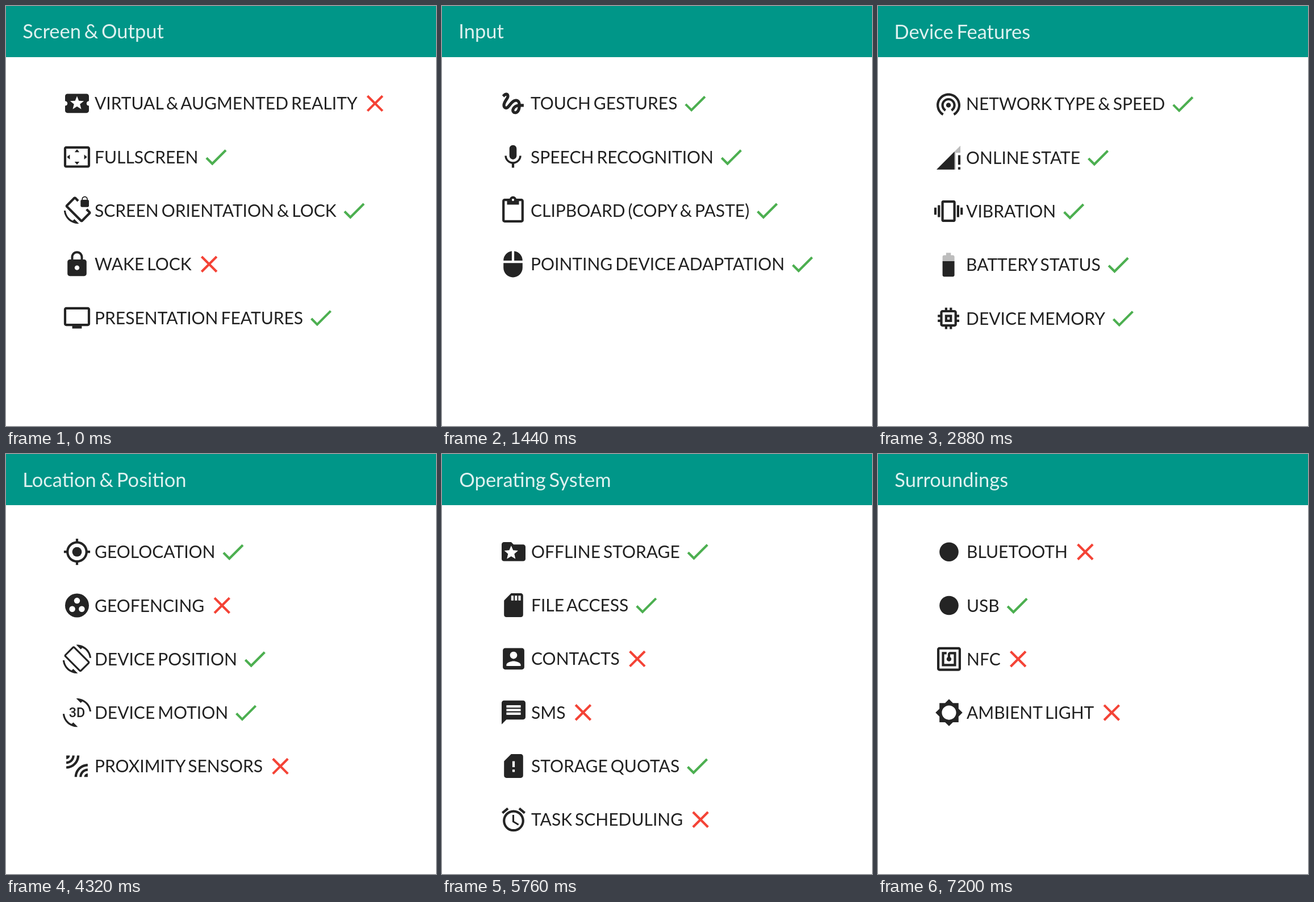
Recreate the animation shown at these times as an HTML page. Size 757 by 739 pixels, loop 8000 ms.

```html
<!DOCTYPE html>
<html lang="en">
<head>
<meta charset="utf-8">
<title>Device capabilities</title>
<style>
  html, body { margin: 0; width: 100%; height: 100%; overflow: hidden; background: #fff; }
  svg { display: block; width: 757px; height: 739px; }
  text { font-family: Lato, sans-serif; word-spacing: -.09em; }
  .title { font-size: 34.5px; fill: #fff; fill-opacity: .87; }
  .label { font-size: 30px; fill: #212121; }
  .icon { fill: #242424; fill-rule: evenodd; }
  .yes { fill: #4caf50; }
  .no { fill: #f44336; }
  .faint { fill-opacity: .3; }
  .glyph { font: 500 11.1px Roboto, sans-serif; text-anchor: middle; }
</style>
</head>
<body>
<svg id="stage" viewBox="0 0 757 739" xmlns="http://www.w3.org/2000/svg">
  <rect width="757" height="739" fill="#fff"/>
  <rect width="757" height="90" fill="#009688"/>
</svg>
<script>
const NS = 'http://www.w3.org/2000/svg';
const stage = document.getElementById('stage');
const ICON = 50.4, LEFT = 99.8, TOP = 171.4, PITCH = 94.3, GAP = 5.8;
const HOLD = 1440, LOOP = 8000;

const p = (d, cls = '') => `<path class="${cls}" d="${d}"/>`;
const dot = r => `<circle cx="12" cy="12" r="${r}"/>`;

// Shared pieces on a 24-unit grid
const turnTop = 'M16.48 2.52c3.27 1.55 5.61 4.72 5.97 8.48h1.5C23.44 4.84 18.29 0 12 0l-.66.03 3.81 3.81z';
const turnBottom = 'M7.52 21.48C4.25 19.94 1.91 16.76 1.55 13H.05C.56 19.16 5.71 24 12 24l.66-.03-3.81-3.81z';
const card = 'M18 2h-8L4.02 8 4 20c0 1.1.9 2 2 2h12c1.1 0 2-.9 2-2V4c0-1.1-.9-2-2-2z';

const icons = {
  yes: p('M9 16.2L4.8 12l-1.4 1.4L9 19 21 7l-1.4-1.4z'),
  no: p('M19 6.41L17.59 5 12 10.59 6.41 5 5 6.41 10.59 12 5 17.59 6.41 19 12 13.41 17.59 19 19 17.59 13.41 12z'),
  ticket: p('M20 12c0-1.1.9-2 2-2V6c0-1.1-.9-2-2-2H4c-1.1 0-1.99.9-1.99 2v4c1.1 0 1.99.9 1.99 2s-.89 2-2 2v4c0 1.1.9 2 2 2h16c1.1 0 2-.9 2-2v-4c-1.1 0-2-.9-2-2zm-4.42 4.8L12 14.5l-3.58 2.3 1.08-4.12-3.29-2.69 4.24-.25L12 5.8l1.54 3.95 4.24.25-3.29 2.69z'),
  overscan: p('M12.01 5.5L10 8h4zM18 10v4l2.5-1.99zM6 10l-2.5 2.01L6 14zM14 16h-4l2.01 2.5zM21 3H3c-1.1 0-2 .9-2 2v14c0 1.1.9 2 2 2h18c1.1 0 2-.9 2-2V5c0-1.1-.9-2-2-2zm0 16.01H3V4.99h18z'),
  rotateLock: p('M23.25 12.77l-2.57-2.57-1.41 1.41 2.22 2.22-5.66 5.66L4.51 8.17l5.66-5.66 2.1 2.1 1.41-1.41L11.23.75c-.59-.59-1.54-.59-2.12 0L2.75 7.11c-.59.59-.59 1.54 0 2.12l12.02 12.02c.59.59 1.54.59 2.12 0l6.36-6.36c.59-.59.59-1.54 0-2.12zM8.47 20.48C5.2 18.94 2.86 15.76 2.5 12H1c.51 6.16 5.66 11 11.95 11l.66-.03-3.81-3.82zM16 9h5c.55 0 1-.45 1-1V4c0-.55-.45-1-1-1v-.5C21 1.12 19.88 0 18.5 0S16 1.12 16 2.5V3c-.55 0-1 .45-1 1v4c0 .55.45 1 1 1zm.8-6.5c0-.94.76-1.7 1.7-1.7s1.7.76 1.7 1.7V3h-3.4z'),
  lock: p('M18 8h-1V6c0-2.76-2.24-5-5-5S7 3.24 7 6v2H6c-1.1 0-2 .9-2 2v10c0 1.1.9 2 2 2h12c1.1 0 2-.9 2-2V10c0-1.1-.9-2-2-2zm-6 9c-1.1 0-2-.9-2-2s.9-2 2-2 2 .9 2 2-.9 2-2 2zm3.1-9H8.9V6c0-1.71 1.39-3.1 3.1-3.1s3.1 1.39 3.1 3.1z'),
  screen: p('M21 3H3c-1.1 0-2 .9-2 2v12c0 1.1.9 2 2 2h5v2h8v-2h5c1.1 0 2-.9 2-2V5c0-1.1-.9-2-2-2zm0 14H3V5h18z'),
  gesture: p('M4.59 6.89c.7-.71 1.4-1.35 1.71-1.22.5.2 0 1.03-.3 1.52-.25.42-2.86 3.89-2.86 6.31 0 1.28.48 2.34 1.34 2.98.75.56 1.74.73 2.64.46 1.07-.31 1.95-1.4 3.06-2.77 1.21-1.49 2.83-3.44 4.08-3.44 1.63 0 1.65 1.01 1.76 1.79-3.78.64-5.38 3.67-5.38 5.37s1.44 3.09 3.21 3.09c1.63 0 4.29-1.33 4.69-6.1H21v-2.5h-2.47c-.15-1.65-1.09-4.2-4.03-4.2-2.25 0-4.18 1.91-4.94 2.84-.58.73-2.06 2.48-2.29 2.72-.25.3-.68.84-1.11.84-.45 0-.72-.83-.36-1.92.35-1.09 1.4-2.86 1.85-3.52.78-1.14 1.3-1.92 1.3-3.28C8.95 3.69 7.31 3 6.44 3 5.12 3 3.97 4 3.72 4.25c-.36.36-.66.66-.88.93zm9.29 11.66c-.31 0-.74-.26-.74-.72 0-.6.73-2.2 2.87-2.76-.3 2.69-1.43 3.48-2.13 3.48z'),
  mic: p('M12 14c1.66 0 3-1.34 3-3V5c0-1.66-1.34-3-3-3S9 3.34 9 5v6c0 1.66 1.34 3 3 3zm5.3-3c0 3-2.54 5.1-5.3 5.1S6.7 14 6.7 11H5c0 3.41 2.72 6.23 6 6.72V21h2v-3.28c3.28-.48 6-3.3 6-6.72z'),
  clipboard: p('M19 2h-4.18C14.4.84 13.3 0 12 0S9.6.84 9.18 2H5c-1.1 0-2 .9-2 2v16c0 1.1.9 2 2 2h14c1.1 0 2-.9 2-2V4c0-1.1-.9-2-2-2zm-7 0c.55 0 1 .45 1 1s-.45 1-1 1-1-.45-1-1 .45-1 1-1zm7 18H5V4h2v3h10V4h2z'),
  mouse: p('M13 1.07V9h7c0-4.08-3.05-7.44-7-7.93zM4 15c0 4.42 3.58 8 8 8s8-3.58 8-8v-4H4zM11 1.07C7.05 1.56 4 4.92 4 9h7z'),
  tether: p('M12 11c-1.1 0-2 .9-2 2s.9 2 2 2 2-.9 2-2-.9-2-2-2zm6 2c0-3.31-2.69-6-6-6s-6 2.69-6 6c0 2.22 1.21 4.15 3 5.19l1-1.74c-1.19-.7-2-1.97-2-3.45 0-2.21 1.79-4 4-4s4 1.79 4 4c0 1.48-.81 2.75-2 3.45l1 1.74c1.79-1.04 3-2.97 3-5.19zM12 3C6.48 3 2 7.48 2 13c0 3.7 2.01 6.92 4.99 8.65l1-1.73C5.61 18.53 4 15.96 4 13c0-4.42 3.58-8 8-8s8 3.58 8 8c0 2.96-1.61 5.53-4 6.92l1 1.73c2.99-1.73 5-4.95 5-8.65 0-5.52-4.48-10-10-10z'),
  signal: p('M22 8V2L2 22h16V8z', 'faint') + p('M17 22V7L2 22zM20 22h2v-2h-2zM20 10v8h2v-8z'),
  vibrate: p('M0 15h2V9H0zM3 17h2V7H3zM22 9v6h2V9zM19 17h2V7h-2zM16.5 3h-9C6.67 3 6 3.67 6 4.5v15c0 .83.67 1.5 1.5 1.5h9c.83 0 1.5-.67 1.5-1.5v-15c0-.83-.67-1.5-1.5-1.5zM16 19H8V5h8z'),
  battery: p('M17 5.33C17 4.6 16.4 4 15.67 4H14V2h-4v2H8.33C7.6 4 7 4.6 7 5.33V9h10z', 'faint') + p('M7 9v11.67C7 21.4 7.6 22 8.33 22h7.33c.74 0 1.34-.6 1.34-1.33V9z'),
  chip: p('M15 9H9v6h6zM13 13h-2v-2h2zM21 11V9h-2V7c0-1.1-.9-2-2-2h-2V3h-2v2h-2V3H9v2H7c-1.1 0-2 .9-2 2v2H3v2h2v2H3v2h2v2c0 1.1.9 2 2 2h2v2h2v-2h2v2h2v-2h2c1.1 0 2-.9 2-2v-2h2v-2h-2v-2zm-4 6H7V7h10z'),
  target: p('M20.94 11c-.46-4.17-3.77-7.48-7.94-7.94V1h-2v2.06C6.83 3.52 3.52 6.83 3.06 11H1v2h2.06c.46 4.17 3.77 7.48 7.94 7.94V23h2v-2.06c4.17-.46 7.48-3.77 7.94-7.94H23v-2zM12 19c-3.87 0-7-3.13-7-7s3.13-7 7-7 7 3.13 7 7-3.13 7-7 7z') + dot(4),
  group: dot(10) + [[8, 15], [12, 8], [16, 15]].map(([x, y]) => `<circle cx="${x}" cy="${y}" r="2.5" fill="#fff"/>`).join(''),
  rotate: p(turnTop + turnBottom + 'M10.23 1.75c-.59-.59-1.54-.59-2.12 0L1.75 8.11c-.59.59-.59 1.54 0 2.12l12.02 12.02c.59.59 1.54.59 2.12 0l6.36-6.36c.59-.59.59-1.54 0-2.12zm4.6 19.44L2.81 9.17l6.36-6.36 12.02 12.02z'),
  spin: p(turnTop + turnBottom) + '<text class="glyph" x="12" y="16">3D</text>',
  waves: p('M6 3H3v3c1.66 0 3-1.34 3-3zm8 0h-2c0 4.97-4.03 9-9 9v2c6.08 0 11-4.93 11-11zm-4 0H8c0 2.76-2.24 5-5 5v2c3.87 0 7-3.13 7-7zm0 18h2c0-4.97 4.03-9 9-9v-2c-6.07 0-11 4.93-11 11zm8 0h3v-3c-1.66 0-3 1.34-3 3zm-4 0h2c0-2.76 2.24-5 5-5v-2c-3.87 0-7 3.13-7 7z'),
  folder: p('M20 6h-8l-2-2H4c-1.1 0-2 .9-2 2v12c0 1.1.9 2 2 2h16c1.1 0 2-.9 2-2V8c0-1.1-.9-2-2-2zm-6.42 12L10 15.9 6.42 18l.95-4.07-3.16-2.74 4.16-.36L10 7l1.63 3.84 4.16.36-3.16 2.74z'),
  sdCard: p(card + 'M12 8h-2V4h2zM15 8h-2V4h2zM18 8h-2V4h2z'),
  contact: p('M3 5v14c0 1.1.89 2 2 2h14c1.1 0 2-.9 2-2V5c0-1.1-.9-2-2-2H5c-1.11 0-2 .9-2 2zm12 4c0 1.66-1.34 3-3 3s-3-1.34-3-3 1.34-3 3-3 3 1.34 3 3zm-9 8c0-2 4-3.1 6-3.1s6 1.1 6 3.1v1H6z'),
  message: p('M20 2H4c-1.1 0-2 .9-2 2v18l4-4h14c1.1 0 2-.9 2-2V4c0-1.1-.9-2-2-2zM18 14H6v-2h12zM18 11H6V9h12zM18 8H6V6h12z'),
  cardAlert: p(card + 'M13 17h-2v-2h2zM13 13h-2V8h2z'),
  alarm: p('M22 5.72l-4.6-3.86-1.29 1.53 4.6 3.86zM7.88 3.39L6.6 1.86 2 5.71l1.29 1.53zM12.5 8H11v6l4.75 2.85.75-1.23-4-2.37zM12 4c-4.97 0-9 4.03-9 9s4.02 9 9 9 9-4.03 9-9-4.03-9-9-9zm0 16c-3.87 0-7-3.13-7-7s3.13-7 7-7 7 3.13 7 7-3.13 7-7 7z'),
  disc: dot(8),
  tag: p('M20 2H4c-1.1 0-2 .9-2 2v16c0 1.1.9 2 2 2h16c1.1 0 2-.9 2-2V4c0-1.1-.9-2-2-2zm0 18H4V4h16zM18 6h-5c-1.1 0-2 .9-2 2v2.28c-.6.35-1 .98-1 1.72 0 1.1.9 2 2 2s2-.9 2-2c0-.74-.4-1.38-1-1.72V8h3v8H8V8h2V6H6v12h12z'),
  light: p('M20 15.31L23.31 12 20 8.69V4h-4.69L12 .69 8.69 4H4v4.69L.69 12 4 15.31V20h4.69L12 23.31 15.31 20H20zM12 18c-3.31 0-6-2.69-6-6s2.69-6 6-6 6 2.69 6 6-2.69 6-6 6z')
};

// dx, dy: small offset of each page
const pages = [
  { title: 'Screen & Output', dx: 0, dy: 0, base: 57, rows: [
    ['ticket', 'VIRTUAL & AUGMENTED REALITY', 'no'],
    ['overscan', 'FULLSCREEN', 'yes'],
    ['rotateLock', 'SCREEN ORIENTATION & LOCK', 'yes'],
    ['lock', 'WAKE LOCK', 'no'],
    ['screen', 'PRESENTATION FEATURES', 'yes']] },
  { title: 'Input', dx: 0, dy: 0, base: 57, rows: [
    ['gesture', 'TOUCH GESTURES', 'yes'],
    ['mic', 'SPEECH RECOGNITION', 'yes'],
    ['clipboard', 'CLIPBOARD (COPY & PASTE)', 'yes'],
    ['mouse', 'POINTING DEVICE ADAPTATION', 'yes']] },
  { title: 'Device Features', dx: -.9, dy: 1, base: 58, rows: [
    ['tether', 'NETWORK TYPE & SPEED', 'yes'],
    ['signal', 'ONLINE STATE', 'yes'],
    ['vibrate', 'VIBRATION', 'yes'],
    ['battery', 'BATTERY STATUS', 'yes'],
    ['chip', 'DEVICE MEMORY', 'yes']] },
  { title: 'Location & Position', dx: 0, dy: .8, base: 58, rows: [
    ['target', 'GEOLOCATION', 'yes'],
    ['group', 'GEOFENCING', 'no'],
    ['rotate', 'DEVICE POSITION', 'yes'],
    ['spin', 'DEVICE MOTION', 'yes'],
    ['waves', 'PROXIMITY SENSORS', 'no']] },
  { title: 'Operating System', dx: 1, dy: .4, base: 58, rows: [
    ['folder', 'OFFLINE STORAGE', 'yes'],
    ['sdCard', 'FILE ACCESS', 'yes'],
    ['contact', 'CONTACTS', 'no'],
    ['message', 'SMS', 'no'],
    ['cardAlert', 'STORAGE QUOTAS', 'yes'],
    ['alarm', 'TASK SCHEDULING', 'no']] },
  { title: 'Surroundings', dx: 0, dy: .8, base: 58, rows: [
    ['disc', 'BLUETOOTH', 'no'],
    ['disc', 'USB', 'yes'],
    ['tag', 'NFC', 'no'],
    ['light', 'AMBIENT LIGHT', 'no']] }
];

function add(parent, name, attrs) {
  const node = document.createElementNS(NS, name);
  for (const key in attrs) node.setAttribute(key, attrs[key]);
  return parent.appendChild(node);
}

function addText(parent, cls, x, y, str) {
  const node = add(parent, 'text', { class: cls, x, y });
  node.textContent = str;
  return node;
}

function addIcon(parent, name, cls, x, cy) {
  const transform = `translate(${x} ${cy - ICON / 2}) scale(${ICON / 24})`;
  add(parent, 'g', { class: cls, transform }).innerHTML = icons[name];
}

const views = pages.map(({ title, dx, dy, base, rows }) => {
  const view = add(stage, 'g', { visibility: 'hidden' });
  addText(view, 'title', 29.3 + dx, base, title);
  rows.forEach(([icon, label, state], i) => {
    const cy = TOP + dy + i * PITCH;
    const x = LEFT + dx + ICON + GAP;
    addIcon(view, icon, 'icon', LEFT + dx, cy);
    const text = addText(view, 'label', x, cy + 11, label);
    addIcon(view, state, state, x + text.getComputedTextLength() + GAP, cy);
  });
  return view;
});

function draw(t) {
  const current = Math.floor((t % LOOP) / HOLD);
  views.forEach((view, i) => view.setAttribute('visibility', i === current ? 'visible' : 'hidden'));
}

const start = performance.now();
function tick() {
  draw(performance.now() - start);
  requestAnimationFrame(tick);
}
tick();
</script>
</body>
</html>
```
